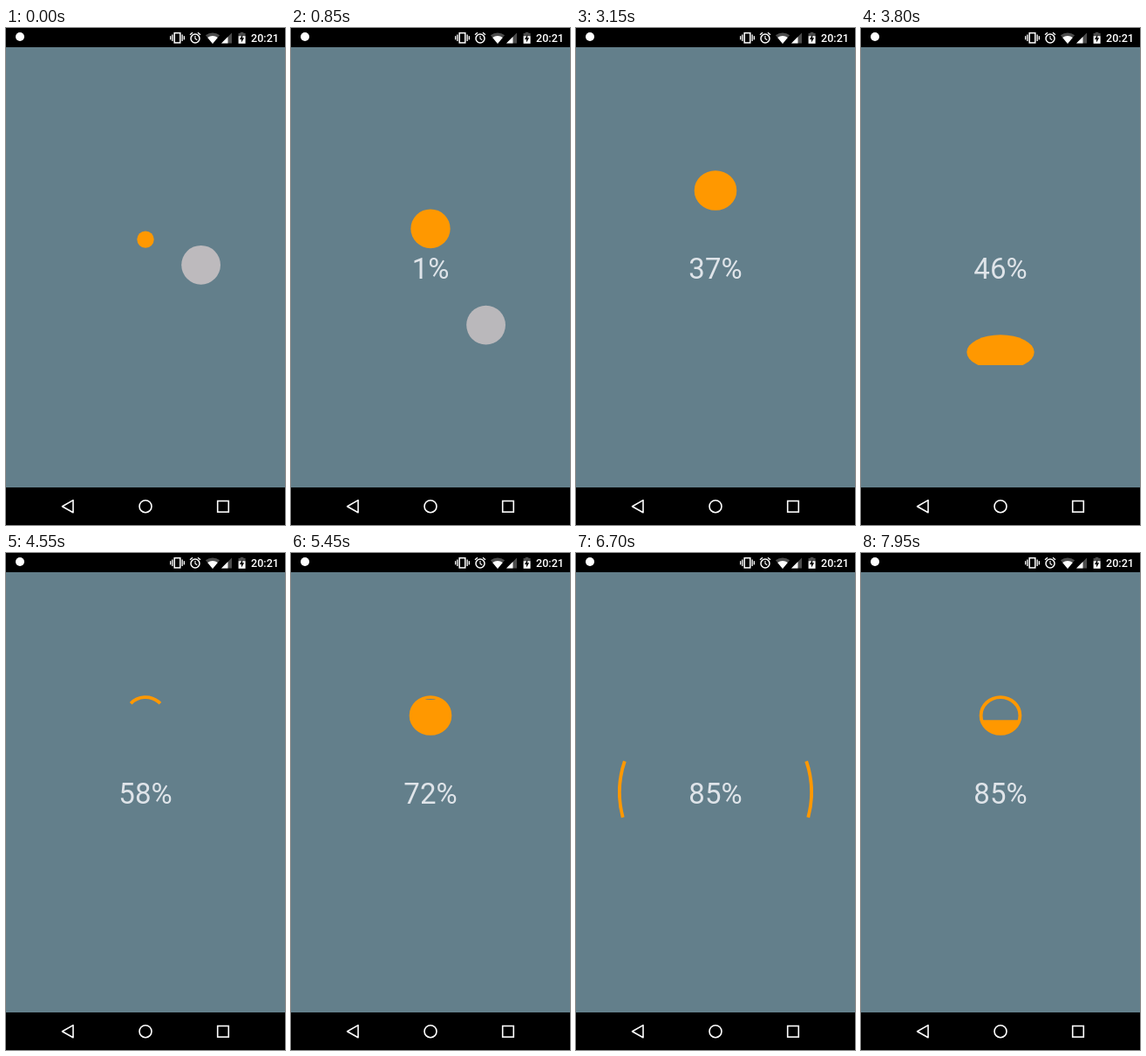
An HTML page with a canvas that plays this animation: 320 px wide and 569 px high, repeating every 8 s.

```html
<!DOCTYPE html>
<html lang="en">
<head>
<meta charset="utf-8">
<title>Circle loader</title>
<style>
  html, body { margin: 0; width: 100%; height: 100%; overflow: hidden; background: #000; }
  canvas { display: block; width: 320px; height: 569px; }
</style>
</head>
<body>
<canvas id="stage"></canvas>
<script>
const W = 320, H = 569, LOOP = 8000, STEP = 50;
const BG = '#637f8b', ORANGE = '#ff9800', GREY = '#bdbabd', DIM = '#4d4d4d';

// The loader lives in a square view; its lengths are in 1/700 of the side.
const SIDE = 224, LEFT = 48, TOP = 162, CX = 160, CY = 274;
const unit = n => n * SIDE / 700;
const STROKE = unit(12), RADIUS = unit(70);
const RING = { y: 186, rx: unit(70), ry: 20.9 };

// Start times of the three rounds.
const ROUNDS = [
  { drop: 660, arcs: 1387, fill: 2425 },
  { drop: 3277, arcs: 3994, fill: 5022 },
  { drop: 5873, arcs: 6590, fill: 7666 }
];
const INTRO = -473, ARCS_MS = 515, FILL_MS = 800;

const canvas = document.getElementById('stage');
const ctx = canvas.getContext('2d');
const ratio = window.devicePixelRatio || 1;
canvas.width = Math.round(W * ratio);
canvas.height = Math.round(H * ratio);
ctx.scale(ratio, ratio);

const rad = deg => deg * Math.PI / 180;
const lerp = (a, b, k) => a + (b - a) * k;
const progress = (t, start, length) => Math.min(1, Math.max(0, (t - start) / length));
const smooth = x => (1 - Math.cos(Math.PI * x)) / 2;
const decelerate = x => 1 - (1 - x) * (1 - x);

function oval(x, y, rx, ry, color) {
  ctx.fillStyle = color;
  ctx.beginPath();
  ctx.ellipse(x, y, rx, ry, 0, 0, 2 * Math.PI);
  ctx.fill();
}

function strokeArc(y, rx, ry, from, to) {
  ctx.strokeStyle = ORANGE;
  ctx.lineWidth = STROKE;
  ctx.beginPath();
  ctx.ellipse(CX, y, rx, ry, 0, rad(from), rad(to));
  ctx.stroke();
}

function poly(points, fill, stroke, width) {
  ctx.beginPath();
  points.forEach(([x, y], i) => i ? ctx.lineTo(x, y) : ctx.moveTo(x, y));
  if (fill) {
    ctx.fillStyle = fill;
    ctx.fill();
  }
  if (stroke) {
    if (fill !== false) ctx.closePath();
    ctx.strokeStyle = stroke;
    ctx.lineWidth = width;
    ctx.stroke();
  }
}

function box(x, y, w, h, color) {
  ctx.fillStyle = color;
  ctx.fillRect(x, y, w, h);
}

function text(str, x, y, font, color) {
  ctx.font = font + ' Roboto, sans-serif';
  ctx.fillStyle = color;
  ctx.textAlign = 'center';
  ctx.fillText(str, x, y);
}

function drawIntro(t) {
  const rise = smooth(progress(t, INTRO, 1100));
  const grow = smooth(progress(t, INTRO, 1400));
  const r = lerp(unit(15), unit(75), grow);
  oval(CX, CY - unit(255) * rise, r, r, ORANGE);
}

function drawSideCircle(t) {
  const fall = smooth(progress(t, INTRO + 200, 1000));
  ctx.globalAlpha = 1 - smooth(progress(t, INTRO + 1300, 200));
  oval(223.6, 256.9 + unit(260) * fall, RADIUS, RADIUS, GREY);
  ctx.globalAlpha = 1;
}

function drawDrop(t, round) {
  const fall = smooth(progress(t, round.drop, 650));
  const flat = progress(t, round.drop, round.arcs - round.drop) ** 4;
  const y = CY + lerp(-unit(260), unit(360), fall);
  oval(CX, y, lerp(RADIUS, unit(250), flat), RADIUS - 9.4 * flat, ORANGE);
}

function drawArcs(t, round) {
  const k = decelerate(progress(t, round.arcs, ARCS_MS));
  const start = lerp(100, 270, k), end = start + lerp(50, 8, k);
  const r = (SIDE - STROKE) / 2;
  strokeArc(CY, r, r, start, end);
  strokeArc(CY, r, r, 180 - end, 180 - start);
}

function drawRing(t, round) {
  const begin = round.arcs + ARCS_MS;
  const k = decelerate(progress(t, begin, round.fill - begin));
  const half = lerp(25, 180, k);
  strokeArc(RING.y, RING.rx, RING.ry, 270 - half, 270 + half);
}

// The level is the chord of an arc that opens from the bottom.
function drawFill(t, round) {
  const half = Math.min(180, 270 * smooth(progress(t, round.fill, FILL_MS)));
  ctx.fillStyle = ORANGE;
  ctx.beginPath();
  ctx.ellipse(CX, RING.y, RING.rx, RING.ry, 0, rad(90 - half), rad(90 + half));
  ctx.fill();
}

function drawLoader(t) {
  const round = ROUNDS.filter(r => t >= r.drop).pop();
  ctx.save();
  ctx.beginPath();
  ctx.rect(LEFT, TOP, SIDE, SIDE);
  ctx.clip();
  if (t < INTRO + 1500) drawSideCircle(t);
  if (!round) drawIntro(t);
  else if (t < round.arcs) drawDrop(t, round);
  else if (t < round.arcs + ARCS_MS) drawArcs(t, round);
  else {
    if (t >= round.fill) drawFill(t, round);
    drawRing(t, round);
  }
  ctx.restore();
}

function drawPercent(t) {
  const value = Math.floor((t - 724) / 65.5);
  if (value >= 0) text(Math.min(85, value) + '%', CX, 287, '33px', '#dfe4e9');
}

function drawWifi(r, color) {
  ctx.fillStyle = color;
  ctx.beginPath();
  ctx.moveTo(237, 18);
  ctx.arc(237, 18, r, rad(230), rad(310));
  ctx.fill();
}

function drawStatusBar() {
  box(0, 0, W, 22, '#000');
  oval(16, 10, 5, 5, '#fff');

  // Vibrate
  ctx.strokeStyle = '#fff';
  ctx.lineWidth = 1.5;
  ctx.strokeRect(193.2, 5.7, 6.6, 11.2);
  box(190.2, 7.5, 1.3, 7.5, '#fff');
  box(188, 9.2, 1.3, 4.2, '#fff');
  box(201.5, 7.5, 1.3, 7.5, '#fff');
  box(203.7, 9.2, 1.3, 4.2, '#fff');

  // Alarm
  ctx.beginPath();
  ctx.arc(217, 12, 5, 0, 2 * Math.PI);
  ctx.stroke();
  poly([[217, 9], [217, 12.3], [219.3, 13.7]], false, '#fff', 1.1);
  poly([[211, 7.7], [214, 5.2]], false, '#fff', 1.4);
  poly([[223, 7.7], [220, 5.2]], false, '#fff', 1.4);

  // Network
  drawWifi(12.6, DIM);
  drawWifi(9, '#fff');
  poly([[247, 17.5], [259, 17.5], [259, 5.5]], DIM);
  poly([[247, 17.5], [254.5, 17.5], [254.5, 10]], '#fff');

  // Battery
  box(268.8, 4.8, 3.6, 2, DIM);
  box(266.6, 6, 8, 3.2, DIM);
  box(266.6, 9.2, 8, 8.6, '#fff');
  poly([[271.2, 7.5], [268, 13], [270, 13], [270, 16.5], [273.2, 11.2], [271.2, 11.2]], '#000');

  text('20:21', 297, 16, '500 12.6px', '#fff');
}

function drawNavBar() {
  box(0, 526, W, 43, '#000');
  ctx.lineJoin = 'round';
  poly([[64.5, 547.7], [77, 540.6], [77, 554.8]], null, '#fff', 1.6);
  ctx.lineJoin = 'miter';
  ctx.strokeStyle = '#fff';
  ctx.lineWidth = 1.6;
  ctx.beginPath();
  ctx.arc(160, 547.7, 7, 0, 2 * Math.PI);
  ctx.stroke();
  ctx.strokeRect(242.7, 541.5, 12.6, 12.6);
}

function draw(t) {
  box(0, 0, W, H, BG);
  drawLoader(t);
  drawPercent(t);
  drawStatusBar();
  drawNavBar();
}

const begin = performance.now();
function tick() {
  const t = (performance.now() - begin) % LOOP;
  draw(Math.floor(t / STEP) * STEP);
  requestAnimationFrame(tick);
}
tick();
</script>
</body>
</html>
```
